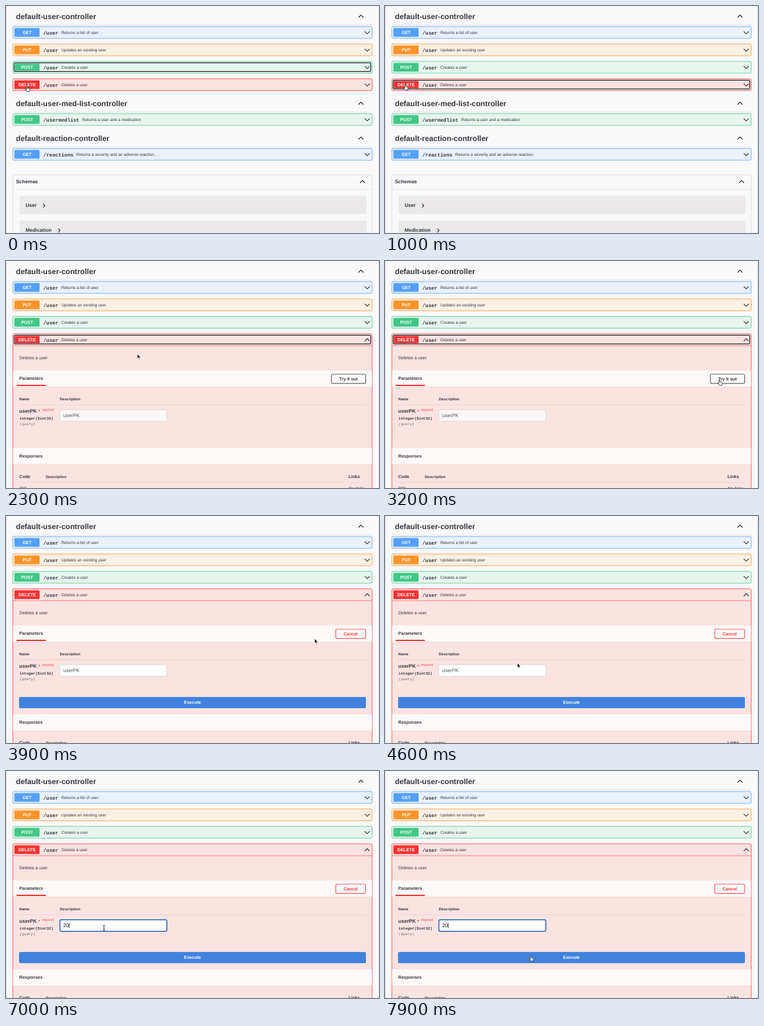
Write an HTML page that moves like this. It is 600 px wide and 365 px high and loops after 8 s.

```html
<!DOCTYPE html>
<html lang="en">
<head>
<meta charset="utf-8">
<title>API page</title>
<style>
html, body { margin: 0; width: 100%; height: 100%; overflow: hidden; background: #fafafa; }
svg { display: block; text-rendering: geometricPrecision; font-family: "Liberation Sans", Arial, sans-serif; }
.mono { font-family: "Liberation Mono", "Courier New", monospace; }
.b { font-weight: 700; }
.i { font-style: italic; }
.mid { text-anchor: middle; }
</style>
</head>
<body>
<svg id="stage" width="600" height="365" viewBox="0 0 600 365"></svg>
<script>
const LOOP = 8000, INK = '#34373f', RED = '#f93636';
const TINT = {
  GET: ['#559ffa', '#e9f1fc'], PUT: ['#fc9429', '#fbf0e4'],
  POST: ['#41c786', '#e7f5ee'], DELETE: ['#fb3232', '#fbe3e2']
};
// Real size of the page text is scaled down to the stage.
const px = n => n * .504;

const text = (x, cy, size, str, cls = '', fill = INK) =>
  `<text x="${x}" y="${cy + px(size) * .35}" font-size="${px(size)}" class="${cls}" fill="${fill}">${str}</text>`;
const rect = (x, y, w, h, fill, stroke = 'none', sw = 1, rx = 0) =>
  `<rect x="${x}" y="${y}" width="${w}" height="${h}" rx="${rx}" fill="${fill}" stroke="${stroke}" stroke-width="${sw}"/>`;
const line = (y, x1 = 11, x2 = 589, color = '#d3d4d8') =>
  `<path d="M${x1} ${y}H${x2}" stroke="${color}" stroke-width=".6"/>`;
const chevron = (x, y, up) =>
  `<path d="M${x - 4} ${y + (up ? 2 : -2)}l4 ${up ? -4 : 4} 4 ${up ? 4 : -4}" fill="none" stroke="#222" stroke-width="1.1"/>`;
const group = (id, body) => `<g id="${id}">${body}</g>`;

const section = (cy, name) =>
  text(16, cy, 24, name, 'b') + chevron(571, cy, true) + line(cy + 13.8);

function row(cy, verb, path, note, height = 19, up = false) {
  const [main, pale] = TINT[verb];
  const noteX = 60 + path.length * px(16) * .6 + 4.7;
  return rect(11, cy - 9.5, 578, height, pale, main, .8, 2) +
    rect(13.5, cy - 7, 40.5, 14, main, 'none', 0, 1.5) +
    text(34, cy, 14, verb, 'b mid', '#fff') +
    text(60, cy + .3, 16, path, 'mono b') +
    text(noteX, cy, 13, note) + chevron(581, cy + .3, up);
}

const band = (y, title) =>
  rect(11.4, y + 25.6, 577.2, 1, '#eed5d4') + rect(11.4, y, 577.2, 26, '#fdf9f8') +
  text(21.3, y + 13, 14, title, 'b');

const button = (x, w, label, stroke, fill) =>
  rect(x, 182, w, 14.8, '#fdfafa', stroke, 1.2, 2) + text(x + w / 2, 189.4, 14, label, 'b mid', fill);

const model = (y, name, arrowX) =>
  rect(22, y, 558, 30, '#ebe9ea', 'none', 0, 2) + text(31.5, y + 15.5, 16, name, 'b') +
  `<path d="M${arrowX - 1.3} ${y + 13.2}l2.7 2.8-2.7 2.8" fill="none" stroke="#222" stroke-width="1.1"/>`;

const list =
  row(126.5, 'DELETE', '/user', 'Deletes a user') +
  section(156.5, 'default-user-med-list-controller') +
  row(182.5, 'POST', '/usermedlist', 'Returns a user and a medication') +
  section(212.5, 'default-reaction-controller') +
  row(238.5, 'GET', '/reactions', 'Returns a severity and an adverse reaction.') +
  rect(11, 271.5, 578, 120, 'none', '#cfd0d3', .7, 2) +
  text(16, 282.5, 16, 'Schemas', 'b') + chevron(573.5, 282.5, true) + line(295) +
  model(305, 'User', 61) + model(345, 'Medication', 85.5);

const responses = band(300.5, 'Responses') +
  text(21.3, 346.5, 14, 'Code', 'b') + text(64, 346.5, 12, 'Description', 'b') +
  text(551, 346.5, 14, 'Links', 'b') + line(356, 21, 579, '#d9c8c9') +
  text(21.3, 366, 14, '200') + text(551, 366, 14, 'No links', 'i');

const panel =
  row(126.5, 'DELETE', '/user', 'Deletes a user', 270, true) +
  line(136.2, 11, 589, RED) + text(21.5, 155.5, 14, 'Deletes a user') +
  band(176, 'Parameters') + rect(17, 199, 47, 2, '#ee2f2f') +
  group('tryOut', button(523.5, 55, 'Try it out', '#62646b', INK)) +
  group('editing', button(530.5, 48, 'Cancel', '#ff5a5a', RED) +
    rect(21, 291, 558, 18, '#4083df', 'none', 0, 2) + text(300, 300, 14, 'Execute', 'b mid', '#fff')) +
  text(21.3, 221.5, 12, 'Name', 'b') + text(86.5, 221.5, 12, 'Description', 'b') +
  line(231.2, 21, 579, '#d9c8c9') +
  text(21.3, 241.5, 16, 'userPK', 'b') +
  text(52, 241.5, 14, '*', 'b', '#f33') + text(57.8, 239.6, 10.5, 'required', '', '#fa4a4a') +
  text(21.8, 252.5, 12, 'integer($int32)', 'mono b') +
  text(21.8, 262.2, 12, '(query)', 'mono i', '#6a6b73') +
  `<rect id="field" x="86.7" y="239.2" width="172" height="18.5" rx="2"/>` +
  `<text id="value" x="92" y="251.4" font-size="${px(16)}"></text>` +
  `<path id="caret" d="M101.6 244.2v8.6" stroke="#111" stroke-width=".8"/>` +
  group('responses', responses);

const pointers =
  `<path id="arrow" d="M0 0v7.4l1.7-1.5 1.2 2.6 1.2-.5-1.2-2.5h2.4z" fill="#111" stroke="#fff" stroke-width=".6"/>` +
  `<path id="hand" d="M-.8.6Q-.8-.3 0-.3T.8.6V3l3 .7Q4.6 4 4.4 5L3.8 8.5H-.2L-2.6 5.2Q-3 4.2-2 4.4L-.8 5.4Z" fill="#fff" stroke="#222" stroke-width=".8"/>` +
  `<path id="beam" d="M-1.7-4Q0-4 0-3 0-4 1.7-4M0-3V3.5M-1.7 4.5Q0 4.5 0 3.5 0 4.5 1.7 4.5M-.8 1H.8" fill="none" stroke="#222" stroke-width=".9"/>`;

const stage = document.getElementById('stage');
stage.innerHTML = rect(0, 0, 600, 365, '#faf9fa') +
  rect(0, 0, .7, 365, '#c9c9cb') + rect(599.4, 0, .6, 365, '#dededf') +
  section(16.5, 'default-user-controller') +
  row(42.5, 'GET', '/user', 'Returns a list of user') +
  row(70.5, 'PUT', '/user', 'Updates an existing user') +
  row(98.5, 'POST', '/user', 'Creates a user') +
  group('list', list) + group('panel', panel) +
  group('ring', rect(13, 91.4, 573.6, 14, 'none', '#fff', 2.2, 1.6) + rect(13, 91.4, 573.6, 14, 'none', '#16181c', 1.2, 1.6)) +
  group('pointer', pointers);

const $ = id => document.getElementById(id);
const show = (id, on) => $(id).style.display = on ? '' : 'none';
const set = (id, attrs) => { for (const k in attrs) $(id).setAttribute(k, attrs[k]); };

// time, x, y of the pointer's hot spot
const track = [
  [0, 34, 129], [400, 34, 129], [900, 32.6, 126.6], [1900, 32.6, 126.6],
  [2900, 538, 191.5], [3700, 538, 191.5], [4600, 213, 236.5],
  [5000, 153, 249.5], [6900, 153, 249.5], [7600, 234.6, 297], [LOOP, 234.6, 297]
];

function pointerAt(t) {
  const n = track.findIndex(k => k[0] > t);
  const [t0, x0, y0] = track[n - 1], [t1, x1, y1] = track[n];
  const u = (t - t0) / (t1 - t0), e = u * u * (3 - 2 * u);
  return [x0 + (x1 - x0) * e, y0 + (y1 - y0) * e];
}

function draw(t) {
  const open = t >= 1200, editing = t >= 3500, focused = t >= 5400;
  const typed = t < 6500 ? '' : t < 6700 ? '2' : '20';
  show('list', !open);
  show('panel', open);
  show('tryOut', !editing);
  show('editing', editing);
  show('ring', !editing);
  set('ring', { transform: `translate(0 ${t < 900 ? 0 : 28})` });
  set('responses', { transform: `translate(0 ${editing ? 18.5 : 0})` });
  set('field', {
    fill: editing ? '#fff' : '#faf7f7',
    stroke: focused ? '#2462b0' : '#d8d3d4', 'stroke-width': focused ? 1.5 : .8
  });
  $('value').textContent = typed || 'userPK';
  set('value', { fill: typed ? '#111' : '#55565c' });
  show('caret', typed === '20');

  const [x, y] = pointerAt(t);
  const inside = (l, top, r, bottom) => x > l && x < r && y > top && y < bottom;
  const beam = editing && inside(86, 239, 259, 258);
  const hand = inside(11, 117, 589, 136) || inside(523, 182, 579, 197) ||
    editing && inside(21, 291, 579, 309);
  set('pointer', { transform: `translate(${x} ${y})` });
  show('beam', beam && !(t > 6450 && t < 6900));
  show('hand', hand);
  show('arrow', !beam && !hand);
}

const start = performance.now();
function tick() {
  draw((performance.now() - start) % LOOP);
  requestAnimationFrame(tick);
}
tick();
</script>
</body>
</html>
```
